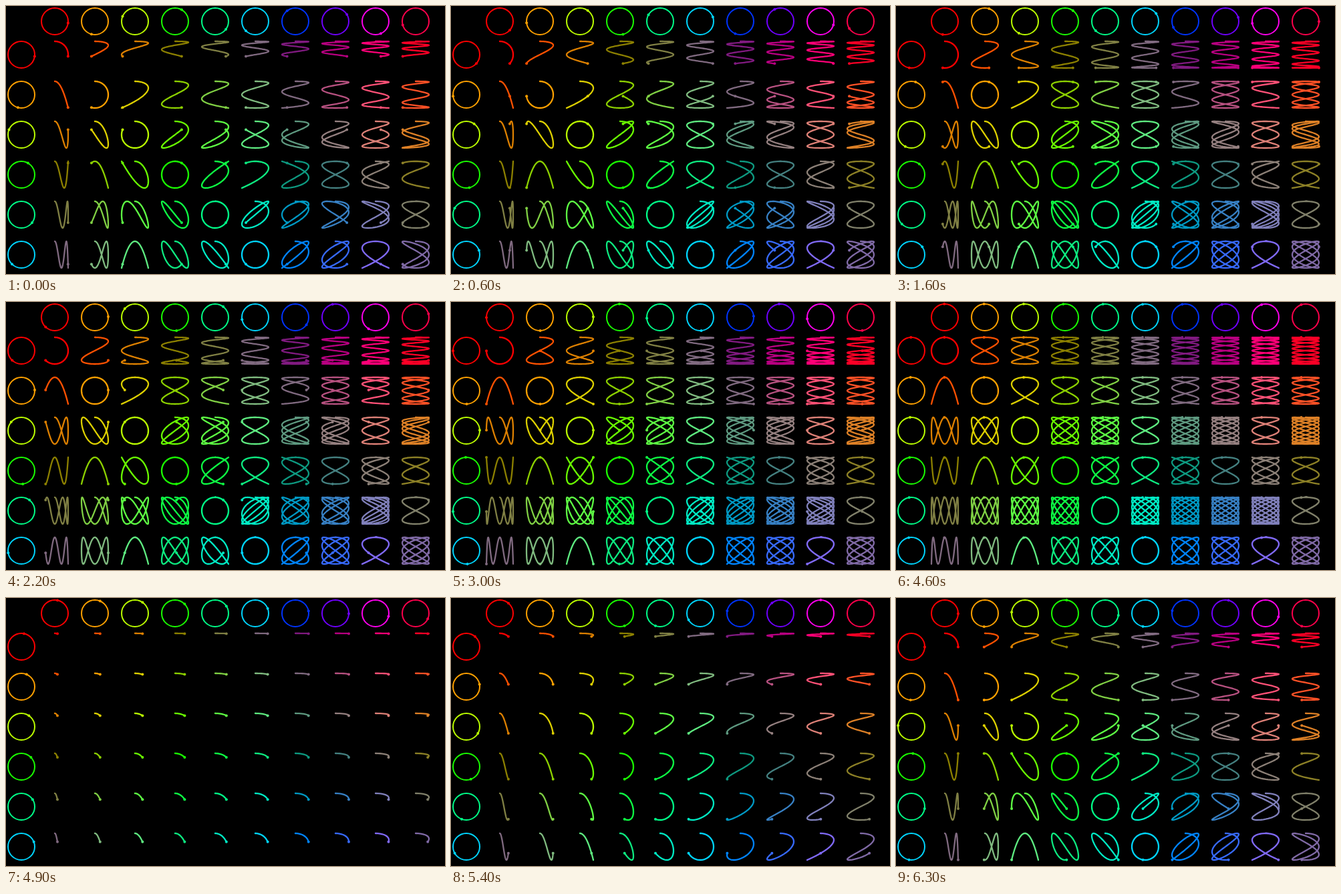
An HTML page with a canvas that plays this animation: 657x402 px, repeating every 6.4 s.

```html
<!DOCTYPE html>
<html lang="en">
<head>
<meta charset="utf-8">
<title>Lissajous table</title>
<style>
  html, body { margin: 0; width: 100%; height: 100%; overflow: hidden; background: #000; }
  canvas { display: block; }
</style>
</head>
<body>
<canvas id="stage" width="657" height="402"></canvas>
<script>
const ctx = document.getElementById("stage").getContext("2d");
const COLS = 10, ROWS = 6, CELL = 60, RADIUS = 20;
const LOOP = 6400, TICK = 100, STEP = 0.1, TAU = 2 * Math.PI;

const hueColor = hue => [0, 8, 4].map(n => {
  const k = (n + hue / 30) % 12;
  return 255 * (0.5 - 0.5 * Math.max(-1, Math.min(k - 3, 9 - k, 1)));
});
const colors = Array.from({ length: COLS }, (_, i) => hueColor(i * 38));
const mix = (a, b) => a.map((v, i) => (v + b[i]) / 2);
const css = rgb => `rgb(${rgb.map(Math.round).join(",")})`;
const center = i => 73 + i * CELL;
const waveX = (cx, freq, angle) => cx + RADIUS * Math.sin(freq * angle);
const waveY = (cy, freq, angle) => cy - RADIUS * Math.cos(freq * angle);

// The drawing pauses once, catches up, then restarts from the top.
function angleAt(time) {
  const tick = Math.floor((time % LOOP) / TICK);
  if (tick < 30) return STEP * (17 + Math.min(tick, 24));
  if (tick < 47) return STEP * (47 + (tick - 30) * 15.5 / 16);
  return STEP * (tick - 47);
}

function dot(x, y) {
  ctx.beginPath();
  ctx.arc(x, y, 2, 0, TAU);
  ctx.fill();
}

function setColor(rgb) {
  ctx.strokeStyle = ctx.fillStyle = css(rgb);
}

function wheel(cx, cy, index, angle) {
  const freq = index + 1;
  setColor(colors[index]);
  ctx.lineWidth = 2;
  ctx.beginPath();
  ctx.arc(cx, cy, RADIUS, 0, TAU);
  ctx.stroke();
  dot(waveX(cx, freq, angle), waveY(cy, freq, angle));
}

function curve(col, row, angle) {
  const cx = center(col), cy = center(row);
  const point = a => [waveX(cx, col + 1, a), waveY(cy, row + 1, a)];
  const count = Math.ceil(angle / 0.02);
  setColor(mix(colors[col], colors[row]));
  ctx.lineWidth = 2.3;
  ctx.beginPath();
  ctx.moveTo(...point(0));
  for (let i = 1; i <= count; i++) ctx.lineTo(...point(angle * i / count));
  ctx.stroke();
  dot(...point(angle));
}

function draw(angle) {
  ctx.fillStyle = "#000";
  ctx.fillRect(0, 0, 657, 402);
  ctx.lineJoin = ctx.lineCap = "round";
  for (let col = 0; col < COLS; col++) wheel(center(col), 23, col, angle);
  for (let row = 0; row < ROWS; row++) {
    wheel(23, center(row), row, angle);
    for (let col = 0; col < COLS; col++) curve(col, row, angle);
  }
}

const start = performance.now();
function frame() {
  draw(angleAt(performance.now() - start));
  requestAnimationFrame(frame);
}
frame();
</script>
</body>
</html>
```
